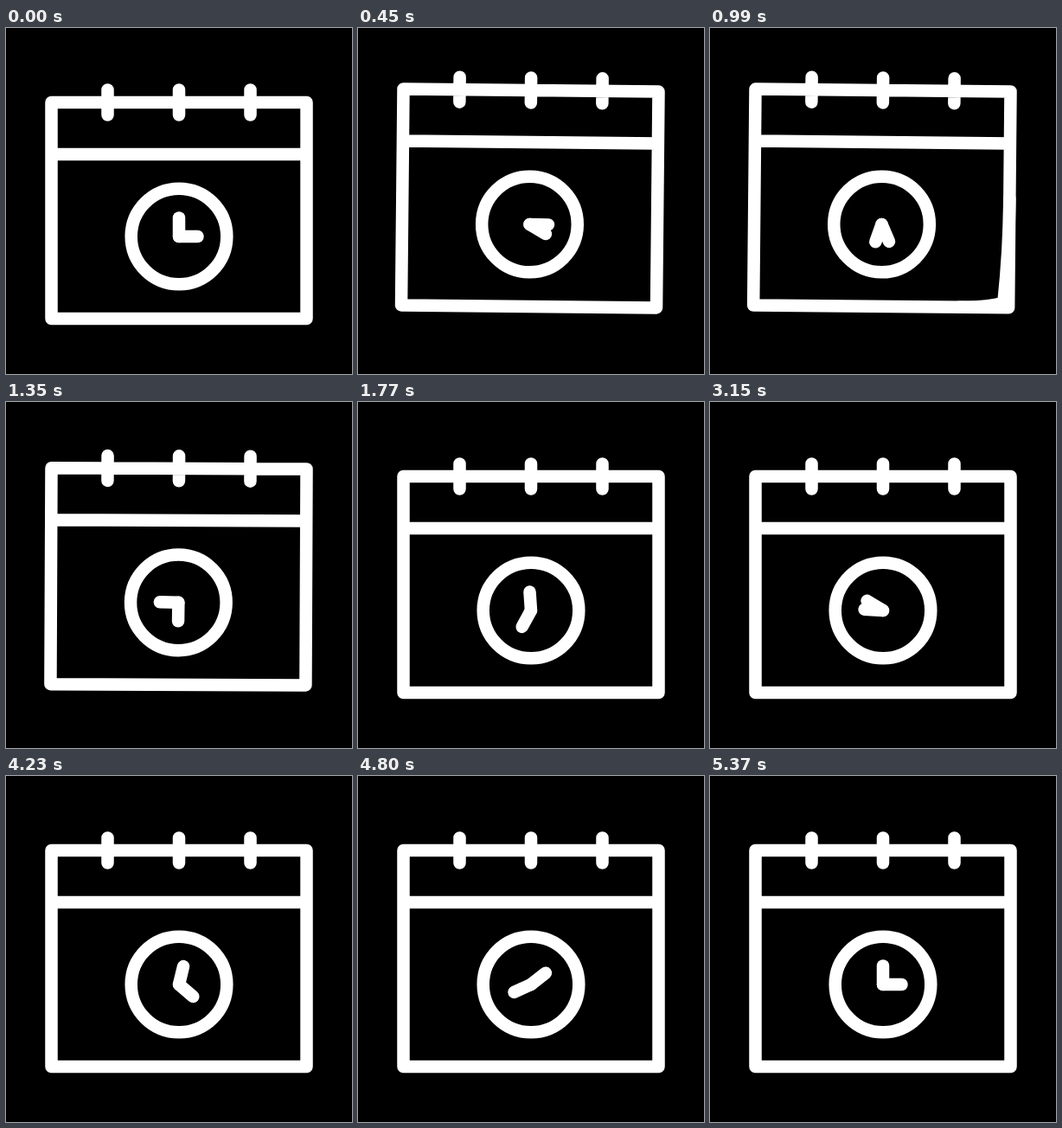
Animation of 400x400 px, one loop 5.4 s. Source, as an HTML page:

```html
<!DOCTYPE html>
<html lang="en">
<head>
<meta charset="utf-8">
<title>Calendar clock</title>
<style>
  html, body { margin: 0; width: 100%; height: 100%; overflow: hidden; background: #000; }
  svg { display: block; width: 100%; height: 100%; }
  g { fill: none; stroke: #fff; stroke-width: 14.5; stroke-linecap: round; stroke-linejoin: round; }
</style>
</head>
<body>
<svg viewBox="0 0 400 400">
  <g id="calendar">
    <path d="M52.5 86H347.5V336H52.5ZM52.5 146H347.5M117.5 71.5V100.5M200 71.5V100.5M282.5 71.5V100.5"/>
    <path id="page"/>
    <circle cx="200" cy="241" r="55.3"/>
    <path id="minute" d="M200 241V219.5"/>
    <path id="hour" d="M200 241V219.5"/>
  </g>
</svg>
<script>
const LOOP = 5400, STEP = 30, SPIN = LOOP - STEP;
const [calendar, page, minute, hour] =
  ['calendar', 'page', 'minute', 'hour'].map(id => document.getElementById(id));

// Keys are [time, value] pairs, eased in and out between neighbours.
const lift = [[0, 0], [330, 14], [1170, 14], [1620, 0]];
const sway = [[0, 0], [250, -0.45], [540, 0.85], [800, -0.9], [1070, 0.9], [1500, 0]];
const curl = [[850, 0], [1040, 7], [1260, 0]];

function at(keys, t) {
  const i = keys.findIndex(key => key[0] > t);
  if (i < 0) return keys[keys.length - 1][1];
  if (i === 0) return keys[0][1];
  const [t0, v0] = keys[i - 1], [t1, v1] = keys[i];
  return v0 + (v1 - v0) * (1 - Math.cos(Math.PI * (t - t0) / (t1 - t0))) / 2;
}

function turn(hand, degrees) {
  hand.setAttribute('transform', `rotate(${degrees} 200 241)`);
}

function draw(t) {
  calendar.setAttribute('transform',
    `translate(0 ${-at(lift, t)}) rotate(${at(sway, t)} 200 86)`);
  const c = at(curl, t), x = 347.5 - c, y = 336 - c;
  page.setAttribute('d', `M347.5 210Q347.5 270 ${x} ${y}Q325 336 290 336`);
  page.style.display = c ? '' : 'none';
  turn(minute, 1080 * t / SPIN);
  turn(hour, 90 + 360 * t / SPIN);
}

const start = performance.now();
function tick() {
  const t = (performance.now() - start) % LOOP;
  draw(Math.floor(t / STEP) * STEP);
  requestAnimationFrame(tick);
}
tick();
</script>
</body>
</html>
```
